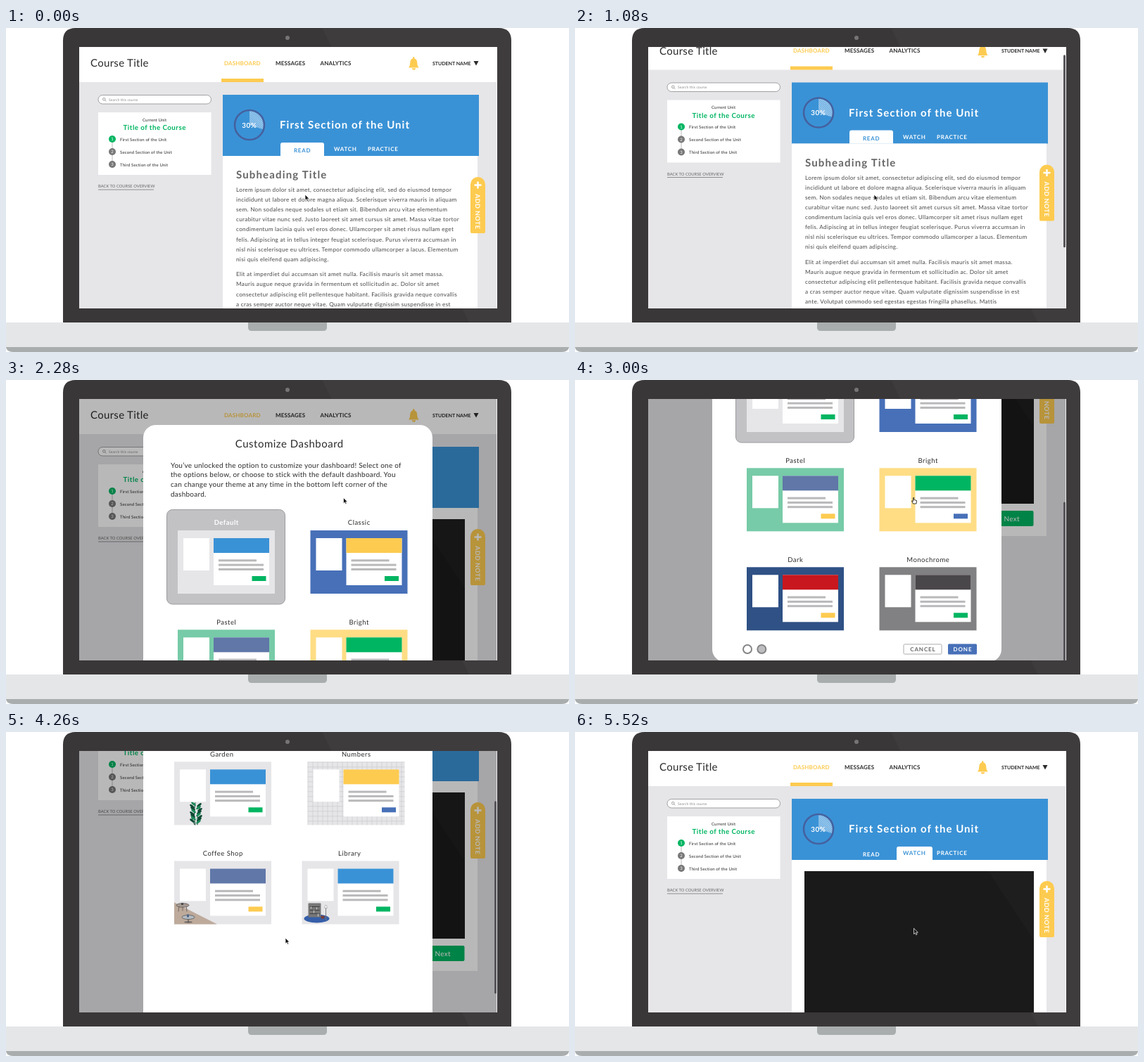
Write an HTML page that moves like this. It is 800 px wide and 461 px high and loops after 5.58 s.

```html
<!DOCTYPE html>
<html lang="en">
<head>
<meta charset="utf-8">
<title>Course dashboard</title>
<style>
html, body { margin: 0; width: 100%; height: 100%; overflow: hidden; background: #fff; }
svg { display: block; width: 100vw; height: 100vh; font-family: Lato, sans-serif; text-rendering: geometricPrecision; }
</style>
</head>
<body>
<svg id="stage" viewBox="0 0 800 461"></svg>
<script>
const BLUE = '#3a92d6', GREEN = '#00b562', YELLOW = '#fdcb50', NAVY = '#4770b8', SLATE = '#6077a8',
      PALE = '#e6e5e8', INK = '#2b2b2d', GREY = '#777';

const rect = (x, y, w, h, fill, r = 0, extra = '') =>
  `<rect x="${x}" y="${y}" width="${w}" height="${h}" rx="${r}" fill="${fill}" ${extra}/>`;
const circle = (x, y, r, fill, extra = '') => `<circle cx="${x}" cy="${y}" r="${r}" fill="${fill}" ${extra}/>`;
const ellipse = (x, y, rx, ry, fill, extra = '') =>
  `<ellipse cx="${x}" cy="${y}" rx="${rx}" ry="${ry}" fill="${fill}" ${extra}/>`;
const path = (d, fill = 'none', extra = '') => `<path d="${d}" fill="${fill}" ${extra}/>`;
const line = (d, color, width = 1) => path(d, 'none', `stroke="${color}" stroke-width="${width}"`);
const text = (x, y, str, size, { fill = INK, bold, gap = 0, mid } = {}) =>
  `<text x="${x + (mid ? gap / 2 : 0)}" y="${y}" font-size="${size}" fill="${fill}" letter-spacing="${gap}"` +
  `${bold ? ' font-weight="700"' : ''}${mid ? ' text-anchor="middle"' : ''}>${str}</text>`;
const group = (id, body, extra = '') => `<g id="${id}" ${extra}>${body}</g>`;
const lines = (x, y, pitch, block, size, style) =>
  block.trim().split('\n').map((s, i) => text(x, y + i * pitch, s.trim(), size, style)).join('');

const paragraphs = [
  `Lorem ipsum dolor sit amet, consectetur adipiscing elit, sed do eiusmod tempor
  incididunt ut labore et dolore magna aliqua. Scelerisque viverra mauris in aliquam
  sem. Non sodales neque sodales ut etiam sit. Bibendum arcu vitae elementum
  curabitur vitae nunc sed. Justo laoreet sit amet cursus sit amet. Massa vitae tortor
  condimentum lacinia quis vel eros donec. Ullamcorper sit amet risus nullam eget
  felis. Adipiscing at in tellus integer feugiat scelerisque. Purus viverra accumsan in
  nisl nisi scelerisque eu ultrices. Tempor commodo ullamcorper a lacus. Elementum
  nisi quis eleifend quam adipiscing.`,
  `Elit at imperdiet dui accumsan sit amet nulla. Facilisis mauris sit amet massa.
  Mauris augue neque gravida in fermentum et sollicitudin ac. Dolor sit amet
  consectetur adipiscing elit pellentesque habitant. Facilisis gravida neque convallis
  a cras semper auctor neque vitae. Quam vulputate dignissim suspendisse in est
  ante. Volutpat commodo sed egestas egestas fringilla phasellus. Mattis
  pellentesque id nibh tortor id aliquet lectus proin nibh. Sed risus ultricies tristique
  nulla aliquet enim tortor at auctor. Lectus vestibulum mattis ullamcorper velit
  sed. Ac tincidunt vitae semper quis lectus nulla at volutpat diam.`,
  `Pellentesque diam volutpat commodo sed egestas egestas. Ipsum faucibus vitae
  aliquet nec ullamcorper sit amet risus. Ultrices sagittis orci a scelerisque purus
  semper eget duis at. Vulputate ut pharetra sit amet aliquam id. Pulvinar sapien et
  ligula ullamcorper malesuada proin libero. Vitae justo eget magna fermentum
  iaculis eu non diam. Mi proin sed libero enim. Neque vitae tempus quam
  pellentesque nec nam. Iaculis at erat pellentesque adipiscing commodo. Lacinia
  at quis risus sed vulputate odio ut enim. Phasellus faucibus scelerisque eleifend
  donec pretium.`
];

function header() {
  const nav = { bold: true, gap: .15 };
  return rect(104, -60, 594, 137, '#fff') +
    text(120, 55, 'Course Title', 15, { gap: .3 }) +
    text(310, 52.7, 'DASHBOARD', 8, { ...nav, fill: YELLOW }) +
    text(383, 52.7, 'MESSAGES', 8, nav) + text(446.5, 52.7, 'ANALYTICS', 8, nav) +
    rect(306, 72, 60, 5, YELLOW) +
    path('M572 56.5q2-2 2.200-7q.3-5.500 4-6.300a1.300 1.300 0 1 1 2 0q3.800.8 4.100 6.300q.2 5 2.500 7z', YELLOW) +
    path('M577 57.300h5a2.500 2.500 0 0 1-5 0z', YELLOW) +
    text(606, 52.500, 'STUDENT NAME', 7, { bold: true }) + path('M664.5 47h7l-3.500 6.500z', INK);
}

function sidebar() {
  const steps = ['First', 'Second', 'Third'].map((name, i) => {
    const y = 158 + 18 * i;
    return circle(151, y, 5, i ? GREY : GREEN) + text(151, y + 2.1, i + 1, 6, { fill: '#fff', mid: true }) +
      text(162, y + 2.700, name + ' Section of the Unit', 6, { gap: .14 });
  }).join('');
  return rect(131, 95.500, 160.5, 12.500, '#fff', 6.2, 'stroke="#8c8c8e" stroke-width=".8"') +
    circle(139.3, 101.300, 1.800, 'none', 'stroke="#777" stroke-width=".7"') + line('M140.600 102.600l1.700 1.700', GREY, .7) +
    text(146, 103.500, 'Search this course', 5, { fill: '#888', gap: .1 }) +
    rect(131, 120, 160.5, 89, '#fff') +
    text(211, 132.5, 'Current Unit', 6, { mid: true, gap: .1 }) +
    text(211, 145.3, 'Title of the Course', 9.800, { fill: GREEN, bold: true, gap: .45, mid: true }) +
    line('M151 158v36', '#aaa', .8) + steps +
    text(131, 227.200, 'BACK TO COURSE OVERVIEW', 5.8, { fill: '#666' }) + line('M131 230h79', GREY, .8);
}

const tab = (x, w) => path(`M${x} 182v-16q0-3 3-3h${w - 6}q3 0 3 3v16z`, '#fff');
const tabName = (x, y, s, fill) => text(x, y, s, 8, { fill, bold: true, gap: .7 });
const nextButton = y => rect(590, y, 61.500, 22, GREEN, 2) + text(620.5, y + 14.800, 'Next', 10, { fill: '#fff', mid: true, gap: .3 });

function banner() {
  return rect(308, 95, 364, 87, BLUE) +
    path('M346 138V117.500A20.500 20.500 0 0 1 365.500 144.300z', 'url(#hatch)') +
    circle(346, 138, 21, 'none', 'stroke="#45619f" stroke-width="2.6"') +
    text(345.5, 141.600, '30%', 9.8, { fill: '#fff', bold: true, gap: .5, mid: true }) +
    text(389, 143, 'First Section of the Unit', 15, { fill: '#fff', bold: true, gap: 1.05 });
}

const readView = () => rect(308, 182, 362, 443, '#fff') + tab(390, 62) +
  tabName(409, 177, 'READ', BLUE) + tabName(466, 175, 'WATCH', '#fff') +
  text(327, 214, 'Subheading Title', 15, { fill: '#666', bold: true, gap: 1.15 }) +
  paragraphs.map((p, i) => lines(327, [233, 353.300, 473.300][i], 14.1, p, 8.2, { fill: '#48484a', gap: .3 })).join('') +
  nextButton(589);

const watchView = () => rect(308, 182, 362, 270, '#fff') + tab(457, 51) +
  tabName(409, 177, 'READ', '#fff') + tabName(466, 175, 'WATCH', BLUE) +
  rect(326, 198, 326, 208, '#1a1a1a') + path('M587 198h65v98z', '#fff', 'opacity=".02"') + nextButton(416);

const noteTab = () => path('M660 290V222.500a10.500 10.500 0 0 1 21 0V290q0 2-2 2h-17q-2 0-2-2z', YELLOW) +
  line('M665.500 223.500h10M670.500 218.500v10', '#fff', 2.4) +
  `<g transform="translate(667 236) rotate(90)">${text(0, 0, 'ADD NOTE', 9, { fill: '#fff', bold: true, gap: .45 })}</g>`;

// Miniature of a dashboard theme; decor is drawn behind the panels.
function theme(x, y, name, bg, head, button, { decor = '', fill = INK, shift = 0 } = {}) {
  return text(x + 69 + shift, y - 7.8, name, 9.5, { fill, gap: .5, mid: true, bold: fill != INK }) +
    `<g transform="translate(${x} ${y})">` + rect(0, 0, 138, 90, bg) + decor +
    rect(8, 11, 37, 46, '#fff') + rect(51, 11, 79, 67, '#fff') + rect(51, 11, 79, 21, head) +
    [54, 64, 64].map((w, i) => rect(58, 41.300 + i * 6.300, w, 3, '#b9b9bb')).join('') +
    rect(105.5, 65, 20, 7, button) + '</g>';
}

function plant() {
  let s = line('M30 90Q27 76 30 58M33 90Q32 74 37 64M29 90Q26 84 24 77', '#0d4a33');
  for (let i = 0; i < 16; i++) {
    const side = i % 2 ? 1 : -1, x = 31 + side * (3.500 + i % 3), y = 60 + i * 1.700;
    s += ellipse(x, y, 4, 1.600, i % 3 ? '#0d4a33' : '#1c8a58', `transform="rotate(${side * -38} ${x} ${y})"`);
  }
  return s;
}
const table = (x, y) => line(`M${x - 5} ${y}l-1 9M${x + 5} ${y}l1 9M${x} ${y}v8`, '#665f5c', .9) +
  ellipse(x, y, 9, 2.800, '#a69a92', 'stroke="#5b5554" stroke-width=".8"') + rect(x - 2, y - 3, 3, 2.500, '#444');
const cafe = () => path('M0 59L61 90H0z', '#bdaa9b') + table(12, 63) +
  ellipse(20, 87, 6, 1.500, '#776f6c') + line('M20 80v7', '#5b5554', 1.3) + ellipse(20, 80, 9, 3, '#b3bcc4', 'stroke="#555" stroke-width=".8"') + rect(18, 76, 3, 4, '#4f6588');
const library = () => ellipse(21, 82, 18, 6, '#365fa9') + rect(9, 60, 18, 20, '#777', 1) +
  line('M11 65h14M11 70h14M11 75h14', '#333', .8) + line('M13 68v-3M17 74v-4M21 69v-3M23 79v-4', '#ccc', 1) +
  line('M34 64v21', '#777', .9) + path('M32 67l1-4h2l1 4z', '#f5f5f5', 'stroke="#888" stroke-width=".5"') +
  rect(27, 78, 5, 4, '#7a3b35', 1);

const themesOne = () => lines(234, 124.5, 13.750,
    `You’ve unlocked the option to customize your dashboard! Select one of
    the options below, or choose to stick with the default dashboard. You
    can change your theme at any time in the bottom left corner of the
    dashboard.`, 10, { gap: .25 }) +
  rect(228.5, 184.5, 168, 134.500, '#c2c1c4', 8, 'stroke="#9c9b9e"') +
  theme(244, 214, 'Default', PALE, BLUE, GREEN, { fill: '#fff' }) +
  theme(432.5, 214, 'Classic', NAVY, YELLOW, GREEN) +
  theme(244, 355.300, 'Pastel', '#77cba8', SLATE, YELLOW) +
  theme(432.5, 355.300, 'Bright', '#fedd85', GREEN, NAVY) +
  theme(244, 496.300, 'Dark', '#2f5185', '#c8171e', YELLOW) +
  theme(432.5, 496.300, 'Monochrome', '#818082', '#4a474a', GREEN);

const themesTwo = () =>
  theme(239, 154.300, 'Garden', PALE, BLUE, GREEN, { decor: plant(), shift: -1.5 }) +
  theme(428.5, 154.300, 'Numbers', PALE, YELLOW, NAVY, { decor: rect(0, 0, 138, 90, 'url(#grid)') }) +
  theme(239, 295.5, 'Coffee Shop', PALE, SLATE, YELLOW, { decor: cafe() }) +
  theme(420.5, 295.5, 'Library', PALE, BLUE, GREEN, { decor: library(), shift: -1.5 });

function modal() {
  const dot = (id, x) => circle(x, 613, 6, '#fff', `id="${id}" stroke="#858487" stroke-width="2"`);
  const label = { bold: true, gap: .9, mid: true };
  return rect(195, 64, 411, 567, '#fff', 18) +
    text(402.5, 96, 'Customize Dashboard', 15, { gap: .5, mid: true }) +
    group('themesOne', themesOne()) + group('themesTwo', themesTwo()) + dot('dotOne', 245) + dot('dotTwo', 265.300) +
    rect(467, 606, 54, 14, '#fff', 1.5, 'stroke="#aaa"') + text(494, 616.100, 'CANCEL', 8, { ...label, fill: '#666' }) +
    rect(530, 605.5, 41, 15, NAVY, 1.5) + text(550.5, 616.100, 'DONE', 8, { ...label, fill: '#fff' });
}

const $ = id => document.getElementById(id);
$('stage').innerHTML = `<defs>
  <clipPath id="screen">${rect(104, 27, 594, 372, '#000')}</clipPath>
  <pattern id="hatch" width="2" height="2" patternUnits="userSpaceOnUse" patternTransform="rotate(-45)">
    ${rect(0, 0, 2, 2, '#68abe0')}${rect(0, 0, 1, 2, '#a3cdee')}</pattern>
  <pattern id="grid" width="7" height="7" patternUnits="userSpaceOnUse">${line('M0 .5H7M.5 0V7', '#cbcbcd', .7)}</pattern>
  </defs>` +
  path('M81 419V18Q81 0 99 0H700Q718 0 718 18V419z', '#3a3738') +
  path('M449 0H700Q718 0 718 18V419H658z', '#fff', 'opacity=".025"') +
  circle(400, 14, 3, '#777476') +
  rect(0, 419, 800, 36, '#e4e6e7') + path('M0 454H800Q799 461 790 461H10Q1 461 0 454z', '#a9adae') +
  path('M344 419H456V426Q456 431 451 431H349Q344 431 344 426z', '#a9adae') +
  `<g clip-path="url(#screen)">` + rect(104, 27, 594, 372, PALE) +
  group('page', header() + sidebar() + banner() + group('read', readView()) + group('watch', watchView()) +
    tabName(514, 175, 'PRACTICE', '#fff') + noteTab()) +
  group('shade', rect(104, 27, 594, 372, '#000', 0, 'opacity=".28"') + group('modal', modal())) +
  rect(694, 27, 3, 274, '#58565a', 1.5, 'id="thumb"') + rect(697.200, 27, .8, 372, '#fff') +
  group('cursor',
    path('M0 0V8.200L1.900 6.500L3.200 9.300L4.600 8.600L3.300 5.900H5.800z', '#111', 'id="arrow" stroke="#fff" stroke-width=".7"') +
    path('M1 0V5L-1 4.500L1 8.500H5.500L6 4L2.300 3V0z', '#fff', 'id="hand" stroke="#222" stroke-width=".9" stroke-linejoin="round"')) +
  '</g>';

const LOOP = 5580, STEP = 60;
const scrollKeys = [[0, 0], [120, 9], [300, 9], [420, 212], [480, 232], [780, 235], [900, 150], [1020, 40],
  [1080, 17.5], [1200, 0], [2400, 0], [2760, 70], [2880, 170], [3000, 230], [3480, 230], [3780, 0], [4020, 0],
  [4260, 112], [4380, 130], [4620, 130], [4860, 230], [5160, 230], [5400, 0]];
const cursorKeys = [[0, 425, 237], [1140, 425, 237], [1440, 479.500, 167.500], [3060, 479.500, 167.500], [3360, 265, 380],
  [3540, 265, 380], [3840, 397, 293], [4620, 397, 293], [4920, 550, 380], [5100, 550, 380], [5460, 481.5, 279.300]];

const clamp = u => Math.min(1, Math.max(0, u));
const smooth = u => u * u * (3 - 2 * u);
function sample(keys, t, ease = u => u) {
  const i = keys.findIndex(k => k[0] > t);
  if (i < 0) return keys.at(-1).slice(1);
  const [a, b] = [keys[i - 1], keys[i]], u = ease((t - a[0]) / (b[0] - a[0]));
  return a.slice(1).map((v, j) => v + (b[j + 1] - v) * u);
}
const between = (t, a, b) => t >= a && t < b;
const show = (id, on) => $(id).setAttribute('visibility', on ? 'visible' : 'hidden');
const move = (id, x, y) => $(id).setAttribute('transform', `translate(${x} ${y})`);

function draw(now) {
  const t = Math.floor(now % LOOP / STEP) * STEP;
  const [scroll] = sample(scrollKeys, t);
  const watching = t >= 1560, second = t >= 3420;
  const hand = between(t, 1380, 1800) || between(t, 2640, 3540) || between(t, 4860, 5160);
  move('page', 0, -scroll);
  move('modal', 0, -scroll);
  move('thumb', 0, scroll * .637);
  move('cursor', ...sample(cursorKeys, t, smooth));
  show('thumb', scroll > 1);
  show('read', !watching);
  show('watch', watching);
  show('themesOne', !second);
  show('themesTwo', second);
  $('dotOne').setAttribute('fill', second ? '#bebdc0' : '#fff');
  $('dotTwo').setAttribute('fill', second ? '#fff' : '#bebdc0');
  $('shade').setAttribute('opacity', Math.min(clamp((t - 1860) / 240), clamp((5280 - t) / 120)));
  show('arrow', !hand);
  show('hand', hand);
  requestAnimationFrame(draw);
}
requestAnimationFrame(draw);
</script>
</body>
</html>
```
